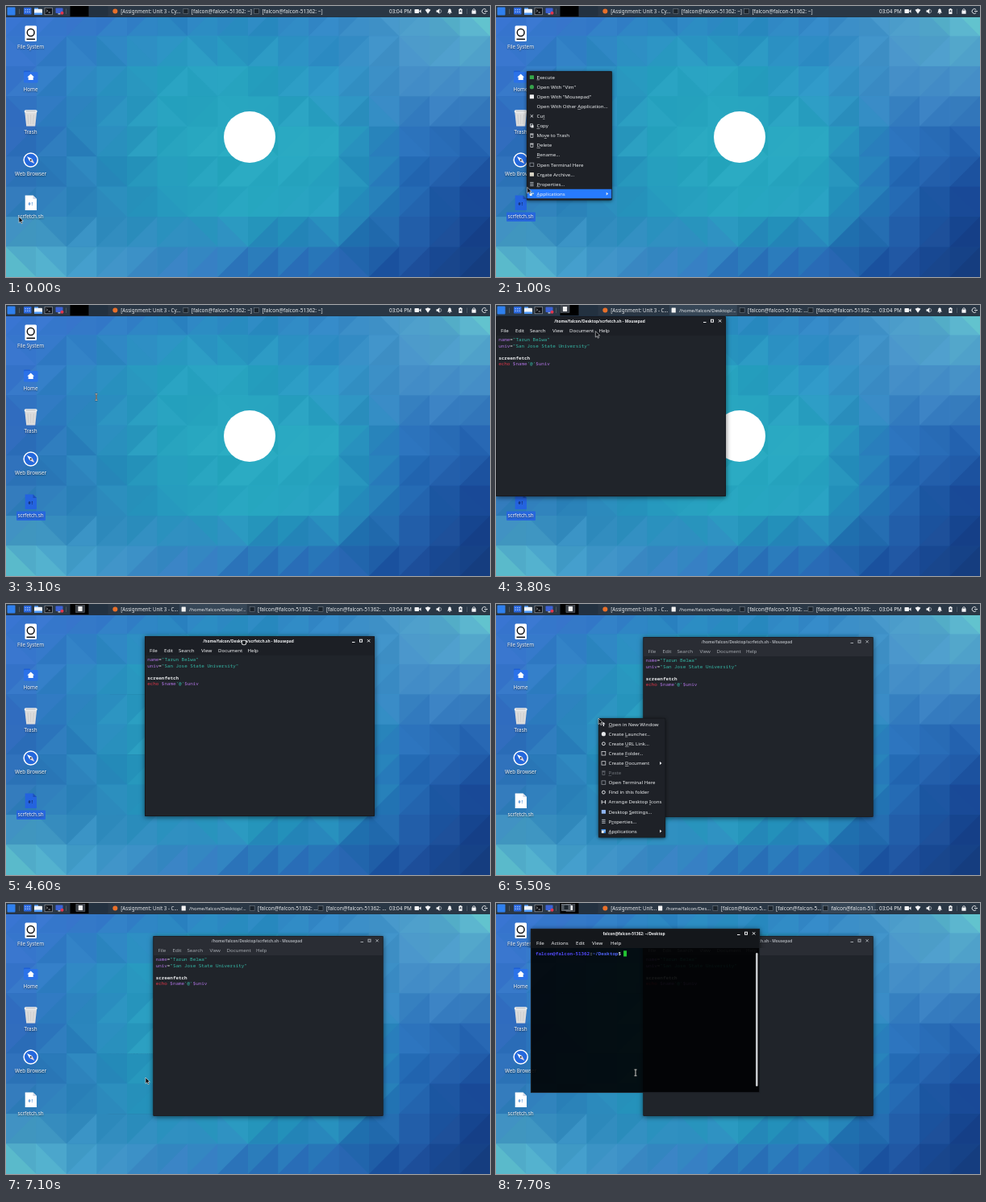
These frames come from a looping animation (600x337 px, 8 s). An HTML page with a canvas:

```html
<!DOCTYPE html>
<html lang="en">
<head>
<meta charset="utf-8">
<title>Desktop session</title>
<style>
html, body { margin: 0; width: 100%; height: 100%; overflow: hidden; background: #2270b4; }
canvas { display: block; width: 600px; height: 337px; }
</style>
</head>
<body>
<canvas id="stage"></canvas>
<script>
const W = 600, H = 337, LOOP = 8000;
const USER = 'falcon', HOST = 'falcon-51362';
const SANS = '"Noto Sans", sans-serif', MONO = '"Noto Sans Mono", monospace';
const dpr = window.devicePixelRatio || 1;

function makeCanvas(c) {
  c.width = Math.round(W * dpr);
  c.height = Math.round(H * dpr);
  const g = c.getContext('2d');
  g.scale(dpr, dpr);
  return g;
}
const stage = document.getElementById('stage');
const ctx = makeCanvas(stage);

// ---------- drawing helpers ----------
function rect(x, y, w, h, fill, r = 0) {
  ctx.fillStyle = fill;
  ctx.beginPath();
  ctx.roundRect(x, y, w, h, r);
  ctx.fill();
}
function frame(x, y, w, h, color, lw = 0.7) {
  ctx.strokeStyle = color;
  ctx.lineWidth = lw;
  ctx.strokeRect(x, y, w, h);
}
function disc(x, y, r, fill) {
  ctx.fillStyle = fill;
  ctx.beginPath();
  ctx.arc(x, y, r, 0, 7);
  ctx.fill();
}
function ring(x, y, r, color, lw) {
  ctx.strokeStyle = color;
  ctx.lineWidth = lw;
  ctx.beginPath();
  ctx.arc(x, y, r, 0, 7);
  ctx.stroke();
}
function poly(points, fill) {
  ctx.fillStyle = fill;
  ctx.beginPath();
  points.forEach(([x, y]) => ctx.lineTo(x, y));
  ctx.closePath();
  ctx.fill();
}
function lines(points, color, lw) {
  ctx.strokeStyle = color;
  ctx.lineWidth = lw;
  ctx.beginPath();
  points.forEach(([x1, y1, x2, y2]) => { ctx.moveTo(x1, y1); ctx.lineTo(x2, y2); });
  ctx.stroke();
}
// y is the middle of the capitals; returns the advance
function text(s, x, y, color = '#eceef0', size = 6.15, { align = 'left', weight = 400, font = SANS } = {}) {
  ctx.font = `${weight} ${size}px ${font}`;
  ctx.textAlign = align;
  ctx.fillStyle = color;
  ctx.fillText(s, x, y + size * 0.36);
  return ctx.measureText(s).width;
}
function runs(x, y, parts, weight) {
  for (const [s, color, w] of parts) x += text(s, x, y, color, 5.9, { weight: w || weight, font: MONO });
  return x;
}
function shadowed(blur, draw) {
  ctx.save();
  ctx.shadowColor = 'rgba(0,0,0,.6)';
  ctx.shadowBlur = blur * dpr;
  ctx.shadowOffsetY = dpr;
  draw();
  ctx.restore();
}

// ---------- wallpaper ----------
const tones = [
  '3a76d4 3873cc 2f7fc4 2c86c2 3483c6 4a9cc8 66cccc',
  '3872cc 2c88c0 27a0c0 27a2c0 2d92c6 4690c8 4c98cc',
  '2c64b8 2a84bc 27a4bf 28aabf 28a6c0 2a72bc 2260ae',
  '327cba 2c84ba 2598bd 26a6bf 269fc0 2266b0 184290',
  '68ccd2 46a0cc 3c80c4 2f6ebc 2660b2 1c4c9a 123876'
].map(row => row.split(' ').map(h => [0, 2, 4].map(i => parseInt(h.slice(i, i + 2), 16))));

function tone(u, v, shift) {
  const nx = tones[0].length - 1, ny = tones.length - 1;
  const i = Math.min(nx - 1, Math.floor(u * nx)), j = Math.min(ny - 1, Math.floor(v * ny));
  const a = u * nx - i, b = v * ny - j;
  const rgb = [0, 1, 2].map(k => {
    const top = tones[j][i][k] * (1 - a) + tones[j][i + 1][k] * a;
    const low = tones[j + 1][i][k] * (1 - a) + tones[j + 1][i + 1][k] * a;
    return Math.round(top * (1 - b) + low * b + shift);
  });
  return `rgb(${rgb})`;
}
const wallpaper = document.createElement('canvas');
(function paintWallpaper() {
  const g = makeCanvas(wallpaper), cols = 16, rows = 9, cw = W / cols, ch = H / rows;
  let seed = 11;
  const rnd = () => (seed = seed * 16807 % 2147483647) / 2147483647;
  for (let r = 0; r < rows; r++) for (let c = 0; c < cols; c++) {
    const x = c * cw, y = r * ch, rise = rnd() < 0.75, dv = rise ? 0.2 : -0.2;
    g.fillStyle = tone((c + 0.3) / cols, (r + 0.5 - dv) / rows, rnd() * 8 - 4);
    g.fillRect(x, y, cw + 0.5, ch + 0.5);
    g.fillStyle = tone((c + 0.7) / cols, (r + 0.5 + dv) / rows, rnd() * 10 - 5);
    g.beginPath();
    g.moveTo(x + cw, y);
    g.lineTo(x + cw, y + ch);
    g.lineTo(x, rise ? y + ch : y);
    g.fill();
  }
  g.fillStyle = '#fff';
  g.beginPath();
  g.arc(302, 163, 32, 0, 7);
  g.fill();
})();

// ---------- desktop icons ----------
function label(s, y) {
  shadowed(1.5, () => text(s, 30.5, y, '#f2f6fa', 6.3, { align: 'center' }));
}
function desktop(selected) {
  rect(23.5, 24.5, 14.5, 19.5, '#fff', 1.5);
  ring(30.7, 33, 4.4, '#15181c', 1.5);
  rect(25.5, 40.5, 10.5, 1.6, '#15181c');
  label('File System', 51);

  rect(22, 80.5, 8, 4, '#1d5fd6', 1);
  rect(22, 82, 17.5, 13.5, '#2b72e8', 1.2);
  poly([[30.7, 84.5], [35, 88.5], [33.7, 88.5], [33.7, 92], [27.7, 92], [27.7, 88.5], [26.4, 88.5]], '#fff');
  label('Home', 104);

  poly([[23.2, 131], [38.2, 131], [36.2, 149.5], [25.2, 149.5]], '#dcdcdc');
  lines([[27, 135, 27.8, 147], [30.7, 135, 30.7, 147], [34.4, 135, 33.6, 147]], '#c8c8c8', 0.8);
  rect(22.7, 129.2, 16, 3.6, '#f0f0f0', 1.8);
  rect(24.5, 130.3, 12.4, 1.3, '#c4c6c8', 0.6);
  label('Trash', 156.5);

  disc(30.7, 191.5, 9.3, '#fff');
  disc(30.7, 191.5, 7.8, '#2468dc');
  poly([[26, 187], [32.2, 190], [29.2, 193]], '#fff');
  poly([[35.4, 196], [32.2, 190], [29.2, 193]], '#e8d9dc');
  disc(30.7, 191.5, 1, '#15181c');
  label('Web Browser', 209);

  const page = selected ? '#2463df' : '#fff';
  poly([[23.7, 235.5], [33.5, 235.5], [38, 240], [38, 254], [23.7, 254]], page);
  poly([[33.5, 235.5], [38, 240], [33.5, 240]], selected ? '#1c4fb8' : '#cfd8e6');
  text('#!', 30.7, 246, selected ? '#132a66' : '#4a8fd8', 5.2, { align: 'center', weight: 700, font: MONO });
  if (selected) rect(13, 256.5, 36, 11.5, '#2767dd', 1);
  label('scrfetch.sh', 262);
}

// ---------- top panel ----------
function terminalIcon(x, y) {
  rect(x - 3, y - 3, 6, 6, '#1c242c', 0.6);
  frame(x - 3, y - 3, 6, 6, '#7d868f', 0.5);
}
const orange = (x, y) => disc(x, y, 3, '#e8702a');
const whitePage = (x, y) => rect(x - 2.6, y - 3, 5.2, 6, '#f2f2f2', 0.5);

function tasksAt(t) {
  const shellName = `${USER}@${HOST}`;
  const web = s => [orange, '[Assignment: Unit' + s, 6.2];
  const shell = s => [terminalIcon, s, 6.5];
  const edit = s => [whitePage, `/home/${USER}/${s}...`, 6];
  if (t < 3200) {
    const full = shell(`[${shellName}: ~]`);
    return { pitch: 87.6, active: -1, list: [web(' 3 - Cy...'), full, full] };
  }
  if (t < 7500) {
    const cut = shell(`[${shellName}: ...`);
    return { pitch: 84.9, active: t < 5500 ? 1 : -1, list: [web(' 3 - C...'), edit('Desktop/'), cut, cut] };
  }
  const short = shell(`[${shellName.slice(0, 15)}...`), front = shell(shellName.slice(0, 16) + '...');
  return { pitch: 68.3, active: 4, list: [web('...'), edit('Des'), short, short, front] };
}
function panel(t) {
  const base = '#2a3745';
  rect(0, 0, W, 13.5, base);
  rect(0, 13, W, 0.8, '#1c2733');
  rect(1.5, 1.5, 10, 10, '#2f80ee', 1);
  lines([[16.5, 3.5, 16.5, 10], [74.5, 3.5, 74.5, 10]], '#56616d', 0.8);
  rect(22, 2, 9.5, 8.5, '#2c68dc', 0.8);
  for (let i = 0; i < 6; i++) rect(23.5 + i % 3 * 2.5, 4 + (i > 2) * 2.7, 1.3, 1.3, '#a9c8ff');
  rect(35, 2.3, 5, 3, '#4c96f4', 0.6);
  rect(35, 3.7, 10, 7.3, '#f1f5fa', 0.8);
  rect(35, 8.6, 10, 2.4, '#4c96f4', 0.6);
  rect(48, 2.2, 9.5, 8.6, '#101318', 0.8);
  frame(48, 2.2, 9.5, 8.6, '#a6abb2', 0.6);
  lines([[50, 4.5, 51.5, 6], [51.5, 6, 50, 7.5], [52.5, 8, 55, 8]], '#fff', 0.6);
  rect(61.5, 2.5, 9, 6.5, '#3c62d4', 0.8);
  rect(64.5, 9, 3, 1.6, '#aab2c0');
  disc(69.5, 8.8, 2, '#e0364f');

  rect(79.5, 0, 23, 13, '#000');
  rect(103.5, 0, 23, 13, '#233140');
  if (t >= 3200) {
    const win = windowAt(t);
    const px = 80 + win.x / 26.5, py = win.y / 26;
    rect(px, py, 11, 9, '#3b4048');
    frame(px, py, 11, 9, '#6a7078', 0.5);
    whitePage(px + 5.5, py + 4.5);
  }
  if (t >= 7500) {
    rect(81.5, 1.5, 11, 8, '#4a5058');
    frame(81.5, 1.5, 11, 8, '#a0a6ae', 0.5);
    terminalIcon(87, 5.5);
  }

  const { pitch, active, list } = tasksAt(t);
  list.forEach(([icon, s, size], i) => {
    const x = 131 + i * pitch;
    if (i === active) rect(x - 1, 0, pitch - 1, 13, '#364656');
    icon(x + 4.3, 6.5);
    text(s, x + 11.2, 6.5, '#e6e8ea', size);
  });

  const white = '#f2f3f5';
  text('03:04 PM', 475, 6.5, white, 6.45);
  rect(506.5, 4, 5.5, 5, white, 0.8);
  poly([[512, 6.5], [514.5, 4.3], [514.5, 8.7]], white);
  poly([[519.5, 4.8], [523, 3.3], [526.5, 4.8], [523, 9.7]], white);
  poly([[533.5, 5.3], [535, 5.3], [537.3, 3.3], [537.3, 9.7], [535, 7.7], [533.5, 7.7]], white);
  ring(537.5, 6.5, 2.2, white, 0.5);
  poly([[547, 8.5], [548, 7.2], [548.5, 4.3], [550, 3.2], [551.5, 4.3], [552, 7.2], [553, 8.5]], white);
  disc(550, 9.2, 0.8, white);
  rect(561.3, 3.7, 4.2, 6.3, white, 0.6);
  rect(562.5, 3, 1.8, 1, white);
  poly([[563.7, 4.8], [562.2, 7.2], [564.6, 7.2]], base);
  lines([[571.5, 3.5, 571.5, 10]], '#56616d', 0.8);
  ring(580, 5.3, 1.6, white, 0.8);
  rect(577.4, 5.6, 5.2, 4.2, white, 0.5);
  ctx.strokeStyle = white;
  ctx.lineWidth = 0.9;
  ctx.beginPath();
  ctx.arc(593, 6.5, 2.9, 0.7, 5.6);
  ctx.stroke();
  lines([[593, 6.5, 597, 6.5]], white, 0.9);
}

// ---------- menus ----------
const glyphs = {
  square: (x, y, c) => rect(x - 2.6, y - 2.4, 5.2, 4.8, c, 0.5),
  dot: (x, y, c) => disc(x, y, 2.6, c),
  box: (x, y, c) => frame(x - 2.4, y - 2.2, 4.8, 4.4, c),
  cross: (x, y, c) => lines([[x - 1.7, y - 1.7, x + 1.7, y + 1.7], [x + 1.7, y - 1.7, x - 1.7, y + 1.7]], c, 0.9),
  copy: (x, y, c) => { frame(x - 2, y - 2.2, 3, 3.2, c); rect(x - 0.8, y - 0.8, 3, 3.2, c); },
  bin: (x, y, c) => { rect(x - 2.2, y - 2.5, 4.4, 1, c); frame(x - 1.5, y - 1.2, 3, 3.6, c); },
  list: (x, y, c) => [-2, 0, 2].forEach(d => rect(x - 2.2, y + d - 0.6, 4.4, 1.2, c)),
  ring: (x, y, c) => ring(x, y, 1.9, c, 1),
  up: (x, y, c) => { poly([[x, y - 2.6], [x + 2, y], [x - 2, y]], c); rect(x - 0.6, y, 1.2, 2.4, c); },
  sides: (x, y, c) => { lines([[x - 2.2, y - 2.2, x - 2.2, y + 2.2], [x + 2.2, y - 2.2, x + 2.2, y + 2.2]], c, 1); lines([[x - 2, y, x + 2, y]], c, 0.7); },
  apps: (x, y, c) => { rect(x - 2.6, y - 2.4, 5.2, 4.8, '#f0f2f4', 0.5); rect(x - 2.6, y - 2.4, 5.2, 1.5, c); rect(x + 0.2, y + 0.1, 2.4, 2.3, c); }
};
const LIGHT = '#e4e6e9', BLUE = '#2a7bd8';
// label ("_" marks the access key, ">" a submenu, "-" disabled), glyph, colour
const fileMenu = { x: 38, y: 81, w: 105.7, h: 160.3, reach: 4, items: [
  ['_Execute', 'square', '#35a84a'], ['Open With "Vim"', 'dot', '#36a24a'],
  ['Open With "Mousepad"', 'square', '#f0f0f0'], ['Open With Other _Application...'],
  ['Cu_t', 'cross', LIGHT], ['_Copy', 'copy', LIGHT], ['Mo_ve to Trash', 'bin', LIGHT],
  ['_Delete', 'bin', LIGHT], ['_Rename...'], ['Open Terminal Here', 'box', '#9aa0a8'],
  ['Cr_eate Archive...', 'square', '#d8d3c4'], ['_Properties...', 'list', '#9aa0a8'],
  ['>_Applications', 'apps', BLUE]
] };
const deskMenu = { x: 127, y: 142, w: 83, h: 148.3, reach: 0, items: [
  ['_Open in New Window', 'up', LIGHT], ['Create _Launcher...', 'dot', LIGHT],
  ['Create _URL Link...', 'ring', LIGHT], ['Create _Folder...', 'box', LIGHT],
  ['>Create _Document', 'box', LIGHT], ['-_Paste', 'bin', '#70757c'],
  ['Open Terminal Here', 'box', '#9aa0a8'], ['Find in this folder', 'ring', LIGHT],
  ['Arrange Desktop _Icons', 'sides', LIGHT], ['Desktop _Settings...', 'square', '#8fb4f0'],
  ['P_roperties...', 'list', '#9aa0a8'], ['>_Applications', 'apps', BLUE]
] };
function menu({ x, y, w, h, reach, items }, cy) {
  shadowed(4, () => rect(x, y, w, h, '#1e2127', 1.5));
  frame(x + 0.2, y + 0.2, w - 0.4, h - 0.4, '#121419', 0.5);
  const pitch = 12.08, hover = Math.floor((cy + reach - y - 1.5) / pitch);
  items.forEach(([raw, glyph, color], i) => {
    const my = y + 7.6 + i * pitch, off = raw[0] === '-';
    if (i === hover && !off) rect(x + 0.5, my - 5.8, w - 1, 11.6, '#277bff');
    if (glyph) glyphs[glyph](x + 6.4, my, color);
    const marked = raw.replace(/^[->]/, ''), key = marked.indexOf('_');
    const s = marked.replace('_', ''), ink = off ? '#70757c' : '#eceef0';
    text(s, x + 12.5, my, ink);
    if (key >= 0) {
      const x0 = x + 12.5 + ctx.measureText(s.slice(0, key)).width;
      rect(x0, my + 3.1, ctx.measureText(s[key]).width, 0.5, ink);
    }
    if (raw[0] === '>') poly([[x + w - 7, my - 2], [x + w - 4.5, my], [x + w - 7, my + 2]], LIGHT);
  });
}

// ---------- windows ----------
function chrome(x, y, w, h, title, names, gaps, ink, bar) {
  shadowed(6, () => rect(x, y, w, h, bar, 1.5));
  text(title, x + w / 2 - 14, y + 5.8, ink, 4.85, { align: 'center', weight: 700 });
  lines([[x + w - 28, y + 7.5, x + w - 24.5, y + 7.5], [x + w - 9, y + 4.2, x + w - 5.8, y + 7.4], [x + w - 5.8, y + 4.2, x + w - 9, y + 7.4]], ink, 1);
  frame(x + w - 18.5, y + 4.2, 3, 3, ink, 1);
  names.split(' ').forEach((s, i) => text(s, x + gaps[i], y + 18, ink));
}
function editor({ x, y }, active) {
  const w = 285, h = 224, ink = active ? '#f0f1f3' : '#a4a8ae';
  chrome(x, y, w, h, `/home/${USER}/Desktop/scrfetch.sh - Mousepad`, 'File Edit Search View Document Help',
    [6, 24, 42, 70, 91, 127.5], ink, active ? '#1c1f25' : '#2a2d34');
  rect(x + 0.7, y + 24, w - 1.4, h - 24.7, '#20242a');
  frame(x + 0.3, y + 0.3, w - 0.6, h - 0.6, '#14171b', 0.6);
  const purple = '#ad72e0', teal = '#35b8a6', white = '#e8eaec', red = '#e0374a';
  const row = i => y + 29 + i * 7.55, left = x + 3.2;
  runs(left, row(0), [['name', purple], ['=', white], ['"Tarun Belwa"', teal]]);
  runs(left, row(1), [['univ', purple], ['=', white], ['"San Jose State University"', teal]]);
  runs(left, row(3), [['screenfetch', white, 700]]);
  runs(left, row(4), [['echo', red], [' $name', purple], ["'@'", teal], ['$univ', purple]]);
}
function terminal() {
  const x = 43, y = 32, w = 284, h = 204;
  rect(x, y + 24, w, h - 24, 'rgba(0,2,3,.91)');
  ctx.save();
  ctx.beginPath();
  ctx.rect(0, 0, W, y + 24);
  ctx.clip();
  chrome(x, y, w, h, `${USER}@${HOST}: ~/Desktop`, 'File Actions Edit View Help',
    [7, 25.5, 56, 76, 99], '#f0f1f3', '#14171b');
  ctx.restore();
  frame(x + 0.4, y + 0.4, w - 0.8, h - 0.8, '#1c2025', 1);
  rect(x + 279, y + 30, 2.6, 166, '#c4c7ca', 1.3);
  const end = runs(x + 6, y + 31, [[`${USER}@${HOST}`, '#5148f4'], [':', '#e8eaec'], ['~/Desktop', '#4f62f6'], ['$ ', '#e8eaec']], 700);
  rect(end - 0.5, y + 27.3, 4, 7.2, '#22c332');
}

// ---------- motion ----------
const path = [
  [0, 16, 262], [400, 37, 243], [900, 37, 243], [1200, 42, 190], [1500, 64, 129], [1700, 98, 116],
  [1800, 112, 111], [2900, 112, 111], [3100, 112, 114.5], [3300, 112, 114.5], [3800, 123.3, 32.5],
  [3900, 123, 31], [4000, 123, 22], [4200, 123, 22], [4600, 295, 48], [4900, 305.5, 49],
  [5100, 197, 68], [5200, 155, 112], [5300, 127, 142], [5600, 127, 142], [6200, 175, 262],
  [6300, 175, 262], [6900, 173, 217], [7200, 173, 217], [7500, 173, 211], [8000, 173, 211]
];
function pointerAt(t) {
  const i = path.findIndex(k => k[0] > t), [t0, x0, y0] = path[i - 1], [t1, x1, y1] = path[i];
  const p = (t - t0) / (t1 - t0);
  return { x: x0 + (x1 - x0) * p, y: y0 + (y1 - y0) * p };
}
function windowAt(t) {
  if (t < 4000) return { x: 0, y: 14 };
  if (t >= 4900) return { x: 182.5, y: 41 };
  const p = pointerAt(t);
  return { x: p.x - 123, y: p.y - 8 };
}
function pointer({ x, y }, t) {
  if ((t >= 2900 && t < 3600) || t >= 7500) {
    const bars = [[x, y - 3.6, x, y + 3.6], [x - 1.5, y - 3.8, x + 1.5, y - 3.8], [x - 1.5, y + 3.8, x + 1.5, y + 3.8]];
    lines(bars, '#15181c', 1.8);
    lines(bars, '#d8d8d4', 0.9);
  } else if (t >= 4300 && t < 4900) {
    disc(x, y, 3.2, '#e8eaec');
    disc(x, y, 2.4, '#15181c');
  } else {
    ctx.beginPath();
    [[0, 0], [0, 7.6], [1.8, 6.1], [3, 8.7], [4.3, 8.1], [3.1, 5.6], [5.4, 5.4]].forEach(([a, b]) => ctx.lineTo(x + a, y + b));
    ctx.closePath();
    ctx.fillStyle = '#0c0d10';
    ctx.fill();
    ctx.strokeStyle = '#e6e8ea';
    ctx.lineWidth = 0.6;
    ctx.stroke();
  }
}

function draw(now) {
  const t = Math.floor(now % LOOP / 100) * 100; // the screen updates ten times a second
  const p = pointerAt(t);
  ctx.drawImage(wallpaper, 0, 0, W, H);
  desktop(t >= 700 && t < 5500);
  if (t >= 3200) editor(windowAt(t), t < 5500);
  if (t >= 7500) terminal();
  panel(t);
  if (t >= 900 && t < 2800) menu(fileMenu, p.y);
  if (t >= 5500 && t < 7100) menu(deskMenu, p.y);
  pointer(p, t);
}
const start = performance.now();
function tick() {
  draw(performance.now() - start);
  requestAnimationFrame(tick);
}
tick();
</script>
</body>
</html>
```
